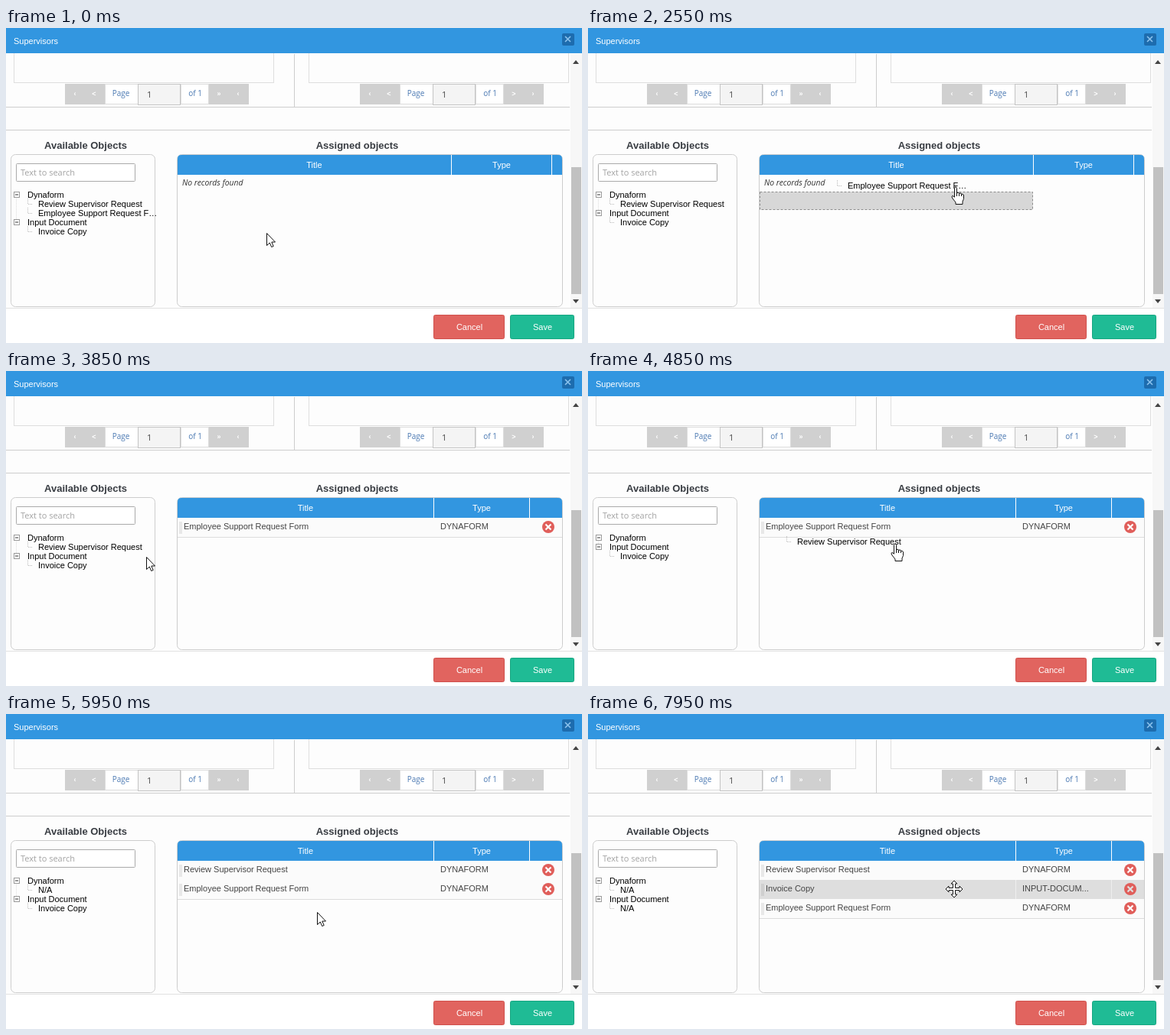
Write an HTML page that moves like this. It is 752 px wide and 412 px high and loops after 8000 ms.

```html
<!DOCTYPE html>
<html lang="en">
<head>
<meta charset="utf-8">
<title>Assign objects</title>
<style>
  html, body { margin: 0; width: 100%; height: 100%; overflow: hidden; background: #fdfdfd; }
  svg { display: block; width: 752px; height: 412px; font: 11px "Liberation Sans", Arial, sans-serif; }
  .open { font-family: "Open Sans", "Noto Sans", sans-serif; }
  .mid { text-anchor: middle; }
  .white { fill: #fff; }
  .head { font-weight: bold; font-size: 13px; fill: #383c42; }
  .line { fill: none; stroke: #cdcdcd; }
  .soft { fill: #fdfdfd; stroke: #dedede; }
  .dots { fill: none; stroke: #bbb; stroke-dasharray: 1 1; }
  .page { font-size: 10px; fill: #4a78b2; }
  .cell { fill: #444; }
  .cursor { stroke: #111; fill: #fff; stroke-linejoin: round; }
</style>
</head>
<body>
<svg viewBox="0 0 752 412">
  <rect width="752" height="412" fill="#fdfdfd"/>
  <g id="pagers"></g>
  <path class="line" d="M0 103.5H736M0 133.5H736M376.5 34V103"/>

  <rect width="752" height="33" fill="#3296e0"/>
  <text x="10" y="21" class="white">Supervisors</text>
  <rect x="726" y="7" width="16" height="16" rx="2" fill="#1d6cae"/>
  <path d="M730 11l7 7m0-7l-7 7" stroke="#8cc3ee" stroke-width="1.6"/>

  <text x="104" y="158" class="head mid">Available Objects</text>
  <text x="458.500" y="158" class="head mid">Assigned objects</text>
  <rect class="line" x="6.500" y="165.500" width="188" height="199" rx="6"/>
  <rect x="13.500" y="177.500" width="155" height="23" rx="1" fill="#fff" stroke="#aaa"/>
  <text x="19" y="193" class="open" fill="#a3a3a3">Text to search</text>

  <rect class="line" x="223.500" y="165.500" width="503" height="199" rx="6"/>
  <path d="M224 192V171q0-5 5-5H721q5 0 5 5V192Z" fill="#3296e0"/>

  <rect x="737" y="34" width="15" height="332" fill="#f7f7f7"/>
  <rect x="738" y="182" width="13" height="166" fill="#c1c1c1"/>
  <path d="M740 47l4-5 4 5zM740 355l4 5 4-5z" fill="#444"/>

  <rect y="366" width="752" height="46" fill="#fff"/>
  <path d="M0 366.500H752" stroke="#e2e2e2"/>
  <rect x="558.500" y="375.500" width="92" height="31" rx="2" fill="#e1645f" stroke="#d0504c"/>
  <text x="605" y="395" class="white mid">Cancel</text>
  <rect x="658.500" y="375.500" width="83" height="31" rx="2" fill="#1fbb95" stroke="#17a681"/>
  <text x="700.500" y="395" class="white mid">Save</text>

  <g id="live"></g>
</svg>
<script>
const LOOP = 8000, ROW = 25, TOP = 192;
const REVIEW = "Review Supervisor Request";
const FORM = "Employee Support Request Form";
const SHORT = "Employee Support Request F…";
const INVOICE = "Invoice Copy";
const GAP = "gap";

const label = (x, y, s, cls = "") => `<text x="${x}" y="${y}" class="${cls}">${s}</text>`;

// Each step patches the one before it. drag: text, grab x, grab y, baseline
const steps = [
  { at: 0, tree: [[REVIEW, SHORT], [INVOICE]], rows: [], drag: null },
  { at: 1650, tree: [[REVIEW], [INVOICE]], drag: [SHORT, 184, 244, 246] },
  { at: 2050, rows: [GAP] },
  { at: 2750, rows: [FORM], drag: null },
  { at: 4350, tree: [[], [INVOICE]], drag: [REVIEW, 171, 233, 234] },
  { at: 5150, rows: [GAP, FORM] },
  { at: 5450, tree: [["N/A"], [INVOICE]], rows: [REVIEW, FORM], drag: null },
  { at: 7050, tree: [["N/A"], []], drag: [INVOICE, 98, 253, 258] },
  { at: 7350, rows: [REVIEW, FORM, GAP] },
  { at: 7550, rows: [REVIEW, GAP, FORM] },
  { at: 7950, tree: [["N/A"], ["N/A"]], rows: [REVIEW, INVOICE, FORM], drag: null }
];

// Pointer path: time, x, y
const path = [
  [0, 340, 268], [850, 235, 266], [1250, 184, 244], [1550, 184, 244],
  [1950, 320, 226], [2350, 470, 210], [2550, 481, 208], [2750, 481, 208],
  [2850, 470, 212], [3050, 405, 240], [3550, 202, 258], [3850, 183, 243],
  [4150, 171, 233], [4350, 171, 233], [4450, 203, 232], [4850, 402, 226],
  [5350, 409, 208], [5450, 408, 209], [5550, 407, 244], [5750, 406, 259],
  [5950, 406, 259], [6550, 108, 260], [6850, 98, 253], [6950, 98, 253],
  [7050, 250, 256], [7150, 385, 258], [7250, 385, 258], [7750, 478, 229],
  [8000, 478, 229]
];

const shapes = [
  [0, "arrow"], [1250, "hand"], [2750, "move"], [2950, "arrow"], [4050, "hand"],
  [5450, "move"], [5550, "arrow"], [6750, "hand"], [7950, "move"]
];

const cursors = {
  arrow: "M.5.5V16.500L4.300 13L6.700 18.500L9.200 17.400L6.800 12H11.500Z",
  hand: "M-2.500 13V1.500q0-1.500 1.500-1.500t1.500 1.500V8.500q0-1.300 1.500-1.300t1.500 1.300V9.200" +
    "q0-1.200 1.500-1.200t1.500 1.200V10.500q0-1.200 1.300-1.200t1.700 1.700V15.500L8 19V22.500H-1V20" +
    "L-5 15q-1.800-2.600-.4-3.400q1.500-.5 2.900 1.900M.5 8V12M3.500 9V12M6.500 10V12",
  move: "M0-11L4-7H1.500V-1.500H7V-4L11 0L7 4V1.500H1.500V7H4L0 11L-4 7H-1.500V1.500H-7V4L-11 0" +
    "L-7-4V-1.500H-1.500V-7H-4Z"
};

function stateAt(t) {
  return Object.assign({}, ...steps.filter(s => s.at <= t));
}

function pointerAt(t) {
  const i = path.findIndex(p => p[0] > t);
  const [a, ax, ay] = path[i - 1], [b, bx, by] = path[i];
  const k = (t - a) / (b - a);
  return [Math.round(ax + (bx - ax) * k), Math.round(ay + (by - ay) * k)];
}

function leaf(x, y, s) {
  return `<path class="dots" d="M${x - 13.5} ${y - 11}V${y - 3.5}H${x - 8}"/>` + label(x, y, s);
}

function drawTree(groups) {
  let y = 222, out = "", last = y;
  groups.forEach((items, i) => {
    out += `<rect x="10.500" y="${y - 7.5}" width="7" height="7" fill="#fff" stroke="#999"/>` +
      `<path d="M12 ${y - 4}H16" stroke="#333"/>` + label(28, y, ["Dynaform", "Input Document"][i]);
    if (i) out += `<path class="dots" stroke-opacity=".5" d="M13.500 ${last + 1}V${y - 8}"/>`;
    last = y;
    y += 12;
    for (const s of items) {
      out += leaf(42, y, s);
      y += 12;
    }
  });
  return out;
}

function drawHeader(c1, c2) {
  return `<path d="M${c1 + .5} 166V192M${c2 + .5} 166V192" stroke="#fff"/>` +
    label((224 + c1) / 2, 183, "Title", "white mid") + label((c1 + c2) / 2 + 0.5, 183, "Type", "white mid");
}

function drawGap(y, right) {
  return `<rect x="224.500" y="${y + .5}" width="${right - 225}" height="23" fill="#d7d7d7" ` +
    `stroke="#8c8c8c" stroke-dasharray="3 2"/>`;
}

function drawRow(s, y, hover) {
  const type = s === INVOICE ? "INPUT-DOCUM..." : "DYNAFORM";
  return `<rect x="224" y="${y}" width="502" height="${ROW}" fill="${hover ? "#dedede" : "#fbfbfb"}"/>` +
    `<path d="M224 ${y + 25.5}H726" stroke="#dcdcdc"/>` +
    (hover ? `<path d="M558.500 ${y}v25M683.500 ${y}v25" stroke="#eee"/>` : "") +
    `<rect x="226" y="${y + 5}" width="4" height="16" fill="${hover ? "#cfcfcf" : "#e8e8e8"}"/>` +
    label(232, y + 15, s, "cell") + label(567, y + 15, type, "cell") +
    `<circle cx="708" cy="${y + 12}" r="8" fill="#e05e5a"/>` +
    `<path d="M704.500 ${y + 8.5}l7 7m0-7l-7 7" stroke="${hover ? "#dedede" : "#fff"}" stroke-width="2.200"/>`;
}

function drawTable(rows, hover) {
  if (!rows.some(s => s !== GAP)) {
    return drawHeader(581, 712) +
      `<text x="230" y="206" class="open" font-style="italic" font-size="10.400" fill="#333">No records found</text>` +
      (rows.length ? drawGap(214, 581) : "");
  }
  return drawHeader(558, 683) + rows.map((s, i) => {
    const y = TOP + ROW * i;
    return s === GAP ? drawGap(y, 558) : drawRow(s, y, i === hover);
  }).join("");
}

function draw(t) {
  const { tree, rows, drag } = stateAt(t);
  const [x, y] = pointerAt(t);
  const shape = shapes.filter(s => s[0] <= t).pop()[1];
  const hover = shape === "move" ? Math.floor((y - TOP) / ROW) : -1;
  let out = drawTree(tree) + drawTable(rows, hover);
  if (drag) {
    const [s, gx, gy, base] = drag;
    out += leaf(42 + x - gx, base + y - gy, s);
  }
  return out + `<path class="cursor" transform="translate(${x} ${y})" d="${cursors[shape]}"/>`;
}

function pager(x, marks) {
  const box = (dx, w, h, fill, stroke) =>
    `<rect x="${x + dx + .5}" y="73.500" width="${w}" height="${h}" fill="${fill}" stroke="${stroke}"/>`;
  const spots = [13, 38, 201, 226];
  return `<rect class="soft" x="${x - 66.5}" y="20.500" width="339" height="51"/>` +
    `<rect x="${x}" y="73" width="240" height="27" fill="#d0d0d0"/>` +
    box(52, 43, 26, "#fff", "#dcdcdc") + box(151, 36, 26, "#fff", "#dcdcdc") +
    box(95, 55, 27, "#f4f4f4", "#c4c4c4") +
    label(x + 73, 89, "Page", "open page mid") + label(x + 170, 89, "of 1", "open page mid") +
    `<text x="${x + 107}" y="91" class="open" fill="#444">1</text>` +
    marks.map((m, i) => `<text x="${x + spots[i]}" y="89" class="white mid" font-size="9" font-weight="bold">${m}</text>`).join("");
}

document.getElementById("pagers").innerHTML =
  pager(77, ["‹", "&lt;", "»", "‹"]) + pager(462, ["‹", "&lt;", "&gt;", "›"]);

const live = document.getElementById("live");
let shown = -1;

function tick() {
  const t = performance.now() % LOOP;
  const q = t < 50 ? 0 : Math.floor((t - 50) / 100) * 100 + 50;
  if (q !== shown) {
    live.innerHTML = draw(q);
    shown = q;
  }
  requestAnimationFrame(tick);
}
tick();
</script>
</body>
</html>
```
